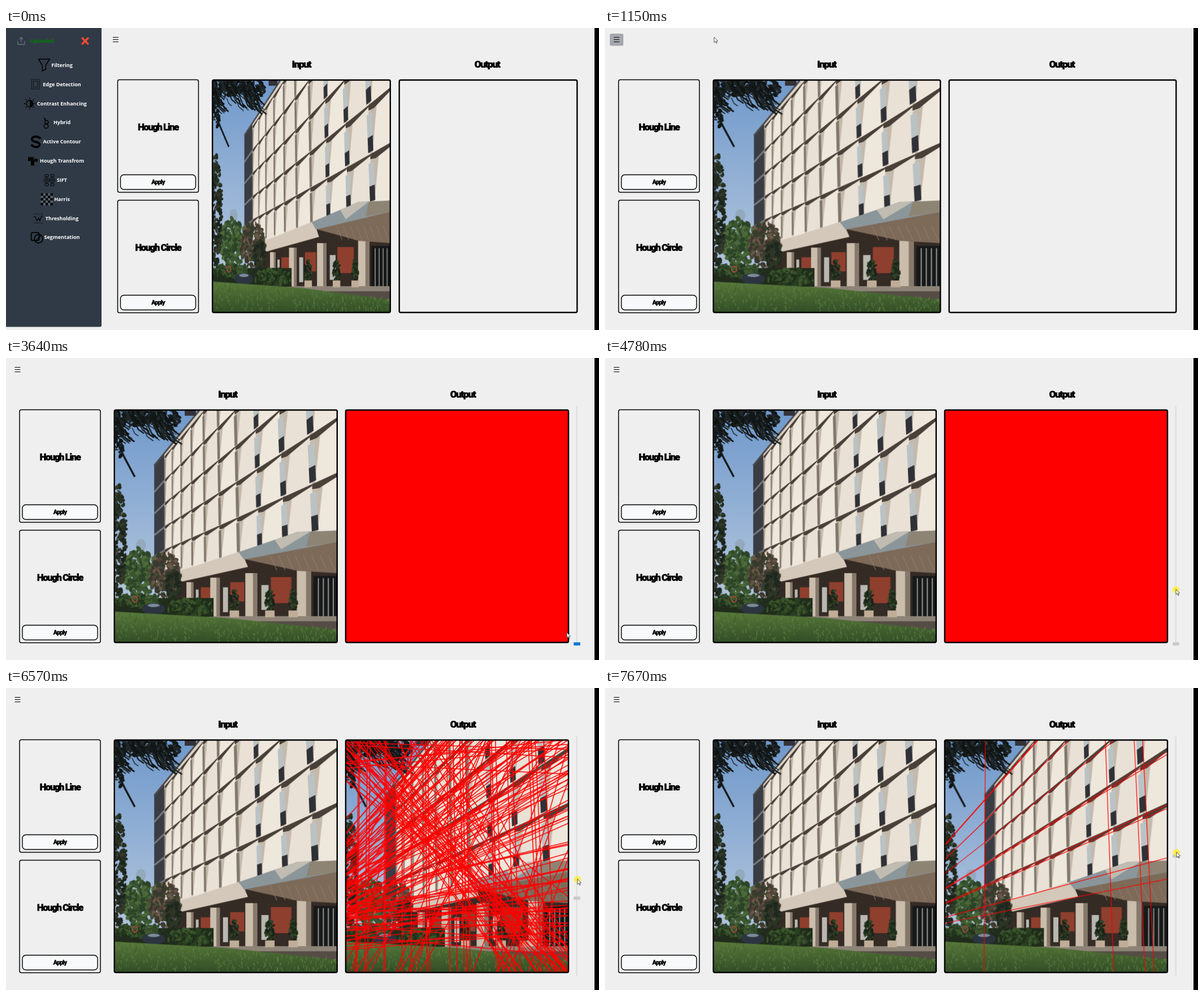
Write an HTML page with a canvas that moves like this. It is 1049 px wide and 534 px high and loops after 8 s.

```html
<!DOCTYPE html>
<html lang="en">
<head>
<meta charset="utf-8">
<title>Hough transform demo</title>
<style>
html, body { margin: 0; width: 100%; height: 100%; overflow: hidden; background: #efefef; }
canvas { display: block; }
</style>
</head>
<body>
<canvas id="stage" width="1049" height="534"></canvas>
<script>
const LOOP = 8000, MENU_CLICK = 1040, MENU_CLOSED = 1110, APPLY_CLICK = 2060, RESULT = 2850, DRAG = 4100;
const HEAVY = 'Roboto, "Open Sans", sans-serif';
const LABEL = '"Open Sans", "Noto Sans", sans-serif';
const stage = document.getElementById('stage').getContext('2d');
let g = stage;

let seed = 7;
function rand(a = 0, b = 1) {
  seed = (seed * 1664525 + 1013904223) >>> 0;
  return a + (b - a) * seed / 4294967296;
}
const mix = (a, b, k) => a + (b - a) * k;
const times = (n, make) => Array.from({ length: n }, (_, i) => make(i));
const between = (t, from, to) => t >= from && t < to;

// ---------- drawing helpers ----------
function rect(color, x, y, w, h) { g.fillStyle = color; g.fillRect(x, y, w, h); }
function trace(points) {
  g.beginPath();
  for (let i = 0; i < points.length; i += 2) g.lineTo(points[i], points[i + 1]);
}
function poly(color, ...points) { trace(points); g.fillStyle = color; g.fill(); }
function line(color, width, ...points) {
  trace(points);
  g.strokeStyle = color; g.lineWidth = width; g.stroke();
}
function oval(color, x, y, rx, ry = rx, angle = 0) {
  g.beginPath(); g.ellipse(x, y, rx, ry, angle, 0, 7);
  g.fillStyle = color; g.fill();
}
function ring(color, width, x, y, r) {
  g.beginPath(); g.arc(x, y, r, 0, 7);
  g.strokeStyle = color; g.lineWidth = width; g.stroke();
}
function box(x, y, w, h, r, width, fill) {
  g.beginPath(); g.roundRect(x, y, w, h, r);
  if (fill) { g.fillStyle = fill; g.fill(); }
  if (width) { g.strokeStyle = '#000'; g.lineWidth = width; g.stroke(); }
}
function label(str, x, y, size, color) {
  g.font = `700 ${size}px ${LABEL}`; g.fillStyle = color;
  g.textAlign = 'left'; g.textBaseline = 'middle'; g.letterSpacing = '0px';
  g.fillText(str, x, y);
}
function heavy(str, x, y, size) {
  g.font = `900 ${size}px ${HEAVY}`; g.fillStyle = g.strokeStyle = '#000';
  g.textAlign = 'center'; g.textBaseline = 'middle';
  g.letterSpacing = -size * .08 + 'px';
  g.lineWidth = size * .035;
  g.fillText(str, x, y); g.strokeText(str, x, y);
}
function picture(w, h, paint) {
  const canvas = document.createElement('canvas');
  canvas.width = w; canvas.height = h;
  g = canvas.getContext('2d');
  paint();
  g = stage;
  return canvas;
}
function fade(y0, y1, top, bottom) {
  const gradient = g.createLinearGradient(0, y0, 0, y1);
  gradient.addColorStop(0, top); gradient.addColorStop(1, bottom);
  return gradient;
}
function leaves(colors, count, cx, cy, rx, ry, size) {
  for (let i = 0; i < count; i++) {
    const a = rand(0, 6.28), d = Math.sqrt(rand());
    oval(colors[i % colors.length], cx + Math.cos(a) * d * rx, cy + Math.sin(a) * d * ry,
      size * rand(.6, 1.4), size * rand(.3, .9), rand(0, 3));
  }
}

// ---------- the photograph: perspective rules ----------
const WALL = 71;
const floorY = (k, x) => mix(103 + 38 * k, -270 + 95 * k, (x - WALL) / 329);
const lean = (x, y) => x + (x - 100) * 2e-4 * y;
const series = (start, step, ratio, i) => start + step * (ratio ** i - 1) / (ratio - 1);
const bayX = i => series(90, 13, 1.19, i);
const pillarX = i => series(129, 43, 1.47, i);

function bay(row, i) {
  const at = (f, v) => {
    const x = mix(bayX(i), bayX(i + 1), f), y = mix(floorY(row, x), floorY(row + 1, x), v);
    return [lean(x, y), y];
  };
  const patch = (color, f0, f1, v0, v1) =>
    poly(color, ...at(f0, v0), ...at(f1, v0), ...at(f1, v1), ...at(f0, v1));
  patch(i % 2 ? '#eee7dc' : '#e9e1d6', 0, 1.02, 0, 1.02);
  poly('#c4b9aa', ...at(0, .1), ...at(.3, .1), ...at(.08, 1), ...at(0, 1));
  poly('#494039', ...at(0, -.03), ...at(1, -.03), ...at(1, .01), ...at(.2, .11), ...at(0, .08));
  if (i > 6) {
    patch('#bac2c4', -.07, .12, .15, .62);
    patch('#2f3136', -.07, .12, .62, .93);
  } else {
    patch('#80776c', -.04, .1, .12, .95);
  }
}

function paintBuilding() {
  g.save();
  trace([WALL, 97, 152, 0, 400, 0, 400, 300, WALL, 300]); g.clip();
  rect('#d9d1c6', 0, 0, 400, 300);
  for (let row = 0; row < 5; row++) for (let i = 0; i < 10; i++) bay(row, i);
  rect('#393d43', WALL, 0, 18, 300);
  for (let k = 1; k < 6; k++) line('#747a80', 3, WALL, floorY(k, WALL) + 3, 89, floorY(k, 89));
  g.restore();
  line('#4c4a49', 3, WALL, 97, 152, 0);
  rect('#343238', 126, 0, 20, 9);
}

function paintEntrance() {
  poly('#352b25', 90, 302, 230, 262, 400, 262, 400, 375, 110, 365);
  poly('#d3c8b9', 90, 292, 228, 248, 240, 276, 112, 304);
  for (let i = 0; i < 4; i++) {
    const x = pillarX(i), w = 13 + 4.2 * i, top = 303 - 8 * i, gap = pillarX(i + 1) - x;
    rect('#cabdac', x, top, w, 386 - top - 18);
    rect('#85796c', x + w * .65, top, w * .35, 386 - top - 18);
    if (i > 2) continue;
    rect('#8f3f2e', x + 26 + 10 * i, 312 - 9 * i, gap * .4, 22 + 12 * i);
    rect('#b9b8b0', x + 17 + 6 * i, 316 - 4 * i, 5 + 4 * i, 44);
  }
  rect('#17191a', 358, 292, 42, 76);
  for (let x = 366; x < 400; x += 9) rect('#a9a9a0', x, 296, 1.7, 68);

  poly('#7d6a59', 233, 262, 400, 230, 400, 287, 330, 283);
  for (let x = 280; x < 400; x += 15) line('#94816d', 1, x, 256, x + 12, 282);
  poly('#8b969a', 223, 250, 330, 214, 400, 212, 400, 232, 233, 263);
  poly('#c0bcb1', 288, 228, 332, 214, 352, 214, 300, 245);
  poly('#8d8474', 352, 214, 400, 212, 400, 232, 345, 240);
}

function paintGarden() {
  rect('#8d8377', 140, 363, 260, 46);
  rect('#554d45', 190, 372, 210, 14);
  for (const x of [215, 279, 321]) {
    leaves(['#1e2e1a', '#33452a', '#18221a'], 60, x, 336, 8, 20, 3);
    rect('#c0ad98', x - 8, 353, 17, 12);
  }
  leaves(['#3a5630', '#4d6a3a', '#2d4327'], 260, 45, 285, 31, 42, 5);
  leaves(['#51443a', '#3a372c', '#695747', '#35402b'], 260, 90, 290, 28, 40, 4);
  leaves(['#1f281f', '#2e3626'], 90, 106, 308, 13, 27, 4);
  leaves(['#1b241c', '#262f22', '#333a2c'], 260, 6, 230, 14, 100, 4);
  rect('#212c1c', 0, 331, 178, 33);
  leaves(['#30492a', '#40592f', '#22341d'], 160, 42, 336, 45, 11, 4);
  oval('#2b343f', 70, 350, 21, 10);
  oval('#7c8b99', 70, 344, 11, 3);
  leaves(['#2a4022', '#3a542c', '#1e2e19'], 160, 136, 347, 42, 14, 4);
  ring('#a34c42', 2, 36, 333, 5);

  poly(fade(355, 409, '#58793a', '#324d27'), 0, 355, 200, 366, 400, 387, 400, 409, 0, 409);
  for (let i = 0; i < 420; i++) {
    const x = rand(0, 400), y = rand(360 + x * .07, 409);
    line(i % 2 ? '#3f602c' : '#638444', 1, x, y, x + rand(-3, 3), y - rand(3, 7));
  }
}

function paintBranches() {
  const bark = ['#14191a', '#20282a', '#101412'];
  leaves(bark, 200, 30, 6, 60, 20, 5);
  leaves(bark, 90, 94, 14, 24, 18, 4);
  leaves(bark, 50, 6, 50, 11, 34, 4);
  for (let i = 0; i < 70; i++) {
    const x = rand(-5, 100), y = rand(0, 34), reach = rand(10, 30);
    line(bark[i % 3], rand(1, 3), x, y, x + reach * .35, y + reach * .7, x + reach * .8, y + reach);
  }
  line(bark[0], 3.5, 2, 52, 18, 84, 36, 117);
}

const photo = picture(400, 409, () => {
  rect(fade(0, 300, '#7099cb', '#adc2dc'), 0, 0, 400, 409);
  oval('#93a9bc', 47, 238, 9, 11);
  paintBuilding();
  paintEntrance();
  paintGarden();
  paintBranches();
});

// ---------- detected lines, in a 392 x 409 field ----------
const floorLine = (k, noise = 0) =>
  [0, floorY(k, 0) + rand(-noise, noise), 392, floorY(k, 392) + rand(-noise, noise)];
const uprightLine = x => [x, 0, lean(x, 409), 409];
function slantLine(x, y, angle) {
  const dx = Math.cos(angle) * 700, dy = Math.sin(angle) * 700;
  return [x - dx, y - dy, x + dx, y + dy];
}
function weakLine() {
  const kind = rand(), x = rand(0, 392);
  if (kind < .46) return floorLine(rand(-.5, 6), 40);
  if (kind < .6) return uprightLine(x + rand(-9, 9));
  if (kind < .8) return slantLine(x, x * .95 + rand(-50, 70), rand(.65, 1.1));
  if (kind < .9) return slantLine(x, rand() < .3 ? rand(0, 60) : rand(290, 365), rand(-.12, .1));
  return slantLine(x, rand(100, 409), rand(-1.3, -.8));
}
const strongLines = [0, .03, 1, 2, 3, 3.05, 4, 4.07, 5, 5.4].map(k => floorLine(k))
  .concat([WALL, 283, 334, 349].map(uprightLine));
const allLines = strongLines.concat(times(500, weakLine));

function specks(color, count, cx, cy, rx, ry, slope) {
  for (let i = 0; i < count; i++) {
    const x = cx + rx * (rand() + rand() - 1), y = cy + ry * (rand() + rand() - 1), n = rand(1, 6);
    line(color, rand(.4, 1.1), x, y, x + n, y + n * slope);
  }
}
function paintFlood(gaps) {
  rect('#f00', 0, 0, 392, 409);
  specks('#fbdcd5', 140 * gaps, 370, 135, 60, 85, -.55);
  specks('#f3d9da', 36 * gaps, 12, 122, 24, 38, 1.3);
  specks('#5e1a12', 55 * gaps, 355, 255, 35, 25, -1.4);
  specks('#a31b0b', 70 * gaps, 200, 330, 195, 80, -1.2);
}

// The threshold slider rises in equal time steps; the number of lines falls exponentially with it.
const FIRST_STEP = 4940, STEP = 545, SLIDER_END = 297;
const results = [505.5, 455, 414, 371.5, 345, 320, SLIDER_END].map(sliderY => ({
  sliderY,
  image: picture(392, 409, () => {
    const count = Math.round(strongLines.length * Math.exp((sliderY - SLIDER_END) / 29));
    if (count > 500) return paintFlood(Math.min(1, (505.5 - sliderY) / 90) ** 3);
    g.drawImage(photo, 0, 0, 392, 409);
    for (const points of allLines.slice(0, count)) line('#f00', count > 100 ? 1.5 : 1.2, ...points);
  }),
}));
function resultAt(t) {
  if (t < RESULT) return null;
  const step = Math.floor((t - FIRST_STEP) / STEP) + 1;
  return results[Math.min(Math.max(step, 0), results.length - 1)];
}

// ---------- sidebar; each icon is drawn around 0,0 ----------
const spokes = (n, draw) => times(n, i => draw(Math.cos(i * 6.283 / n), Math.sin(i * 6.283 / n)));
const menu = {
  'Filtering': () => line('#000', 1.5, -10, -11, 10, -11, 3, 0, 3, 7, -3, 10, -3, 0, -10, -11),
  'Edge Detection': () => {
    box(-7, -9, 14, 17, 0, .7); box(-4, -6, 8, 11, 0, .7);
  },
  'Contrast Enhancing': () => {
    ring('#000', 1.4, 0, 0, 6);
    g.beginPath(); g.arc(0, 0, 6, -Math.PI / 2, Math.PI / 2); g.fill();
    spokes(8, (c, s) => line('#000', 1.4, c * 8, s * 8, c * 10.5, s * 10.5));
  },
  'Hybrid': () => { ring('#000', 1.4, 0, 6, 3.8); ring('#000', 1.4, 1, -1, 3); line('#000', 2, -3, -9, -1, -4); },
  'Active Contour': () => {
    g.beginPath(); g.moveTo(9, -6);
    g.bezierCurveTo(-4, -16, -14, -2, 0, 0);
    g.bezierCurveTo(14, 2, 4, 16, -8, 5);
    g.lineWidth = 3.6; g.strokeStyle = '#000'; g.stroke();
  },
  'Hough Transfrom': () => { rect('#000', -8, -7, 10, 7); rect('#000', -3, 0, 6, 8); rect('#000', 3, -4, 6, 5); },
  'SIFT': () => {
    for (const x of [-5, 5]) {
      ring('#000', 1, x, 0, 4.5); ring('#000', 1, x, 0, 2);
      box(x - 3, -10, 6, 4, 1, 1); box(x - 3, 6, 6, 4, 1, 1);
    }
  },
  'Harris': () => times(25, i =>
    rect(i % 2 ? '#59616a' : '#000', -10.5 + i % 5 * 4.2, -10.5 + Math.floor(i / 5) * 4.2, 4.2, 4.2)),
  'Thresholding': () => {
    g.setLineDash([1.5, 1.5]);
    for (const y of [-8, 8]) line('#000', 1, -8, y, 9, y);
    g.setLineDash([]);
    line('#000', 1.3, -8, -3, -5, -3, -2, 4, 1, -1, 3, 4, 6, -4, 9, -4);
  },
  'Segmentation': () => { box(-10, -9, 14, 14, 3, 1.8); ring('#000', 1.8, 3, 2, 7.5); line('#000', 1.3, -2, 6, 7, -3); },
};
function sidebar() {
  box(-4, -4, 173, 532.5, 3, 0, '#303a46');
  line('#68727c', 1.3, 24, 20, 27, 16.5, 30, 20);
  line('#68727c', 1.3, 27, 17, 27, 25);
  line('#68727c', 1.3, 21, 23, 21, 29, 33, 29, 33, 23);
  label('Uploaded', 43, 24, 8.7, '#008000');
  g.lineCap = 'round';
  for (const d of [-5, 5]) line('#f44a36', 3.4, 140 - d, 18, 140 + d, 28);
  g.lineCap = 'butt';
  Object.entries(menu).forEach(([name, icon], i) => {
    const y = 66 + 33.85 * i;
    g.font = `700 9px ${LABEL}`; g.letterSpacing = '0px';
    const left = 88 - (g.measureText(name).width + 22) / 2;
    g.save(); g.translate(left + 9, y); g.fillStyle = '#000'; icon(); g.restore();
    label(name, left + 22, y + .5, 9, '#fff');
  });
}

// ---------- page ----------
function card(title, x, y, fill) {
  box(x + .5, y + .5, 143, 199, 3, 1.5);
  heavy(title, x + 72, y + 85, 16.5);
  box(x + 5.5, y + 168.5, 133, 26, 6, 1.4, fill);
  heavy('Apply', x + 72, y + 182, 10.7);
}
function panel(x, w, image) {
  if (image) g.drawImage(image, x + 2, 93, w - 4, 409.5);
  box(x + 1.2, 92, w - 2.4, 411, 2.5, 2.4);
}

// cursor moves: start, end, target x and y
const moves = [
  [60, 820, 193, 16], [1300, 1870, 130, 268], [2290, 2650, 848, 334], [3060, 3860, 1010, 504],
  [DRAG, 4900, 1010, 405], [4940, 5470, 1010, 385], [5880, 6680, 1011, 336], [6710, 7290, 1011, 290],
];
function cursor(t) {
  if (t < moves[0][0]) return;
  let x = 789, y = 360;
  for (const [start, end, toX, toY] of moves) {
    const k = Math.min(Math.max((t - start) / (end - start), 0), 1), eased = 1 - (1 - k) ** 1.7;
    x = mix(x, toX, eased); y = mix(y, toY, eased);
  }
  const pressed = t >= DRAG || between(t, MENU_CLICK, MENU_CLOSED) || between(t, APPLY_CLICK, APPLY_CLICK + 80);
  if (pressed) oval('rgba(255,240,20,.7)', x, y + 1, 6.3);
  g.save(); g.translate(x, y);
  const arrow = [0, 0, 0, 9.6, 2.2, 7.6, 3.8, 11, 5.2, 10.4, 3.7, 7.2, 6.6, 7, 0, 0];
  poly('#fff', ...arrow); line('#333', .8, ...arrow);
  g.restore();
}
function applyColor(t) {
  if (!between(t, 1780, RESULT)) return '#f8f9fa';
  if (t < APPLY_CLICK) return '#d3d4d5';
  return t < APPLY_CLICK + 80 ? '#c6c7c8' : '#d9dbdd';
}

function draw(t) {
  rect('#efefef', 0, 0, 1049, 534);
  rect('#000', 1041, 0, 8, 534);
  const open = t < MENU_CLOSED, result = resultAt(t);
  if (open) sidebar();

  const menuX = open ? 194 : 20.5;
  if (between(t, 780, 1450)) {
    g.globalAlpha = Math.min(1, (1450 - t) / 150);
    box(menuX - 12, 10, 24, 21.5, 3, 0, '#a4a8ae');
    g.globalAlpha = 1;
  }
  for (const y of [16.5, 20.5, 24.5]) line('#111', 1.1, menuX - 5, y, menuX + 5, y);

  heavy('Input', open ? 522.5 : 392, 65, 17.2);
  heavy('Output', open ? 851 : 808, 65, 17.2);
  const cardX = open ? 197 : 23.5;
  card('Hough Line', cardX, 91, applyColor(t));
  card('Hough Circle', cardX, 304, '#f8f9fa');

  const width = open ? 317 : result ? 396.5 : 404, right = result ? 996.2 : 1011.5;
  panel(open ? 364 : 190.5, width, photo);
  panel(right - width, width, result && result.image);
  if (result) {
    rect('#e0e0e0', 1008.5, 85, 2.5, 424);
    rect(t < DRAG ? '#0a7ad6' : '#c9c9c9', 1004.2, result.sliderY - 2.8, 11.6, 5.6);
  }
  cursor(t);
}

function frame() {
  draw(performance.now() % LOOP);
  requestAnimationFrame(frame);
}
frame();
</script>
</body>
</html>
```
